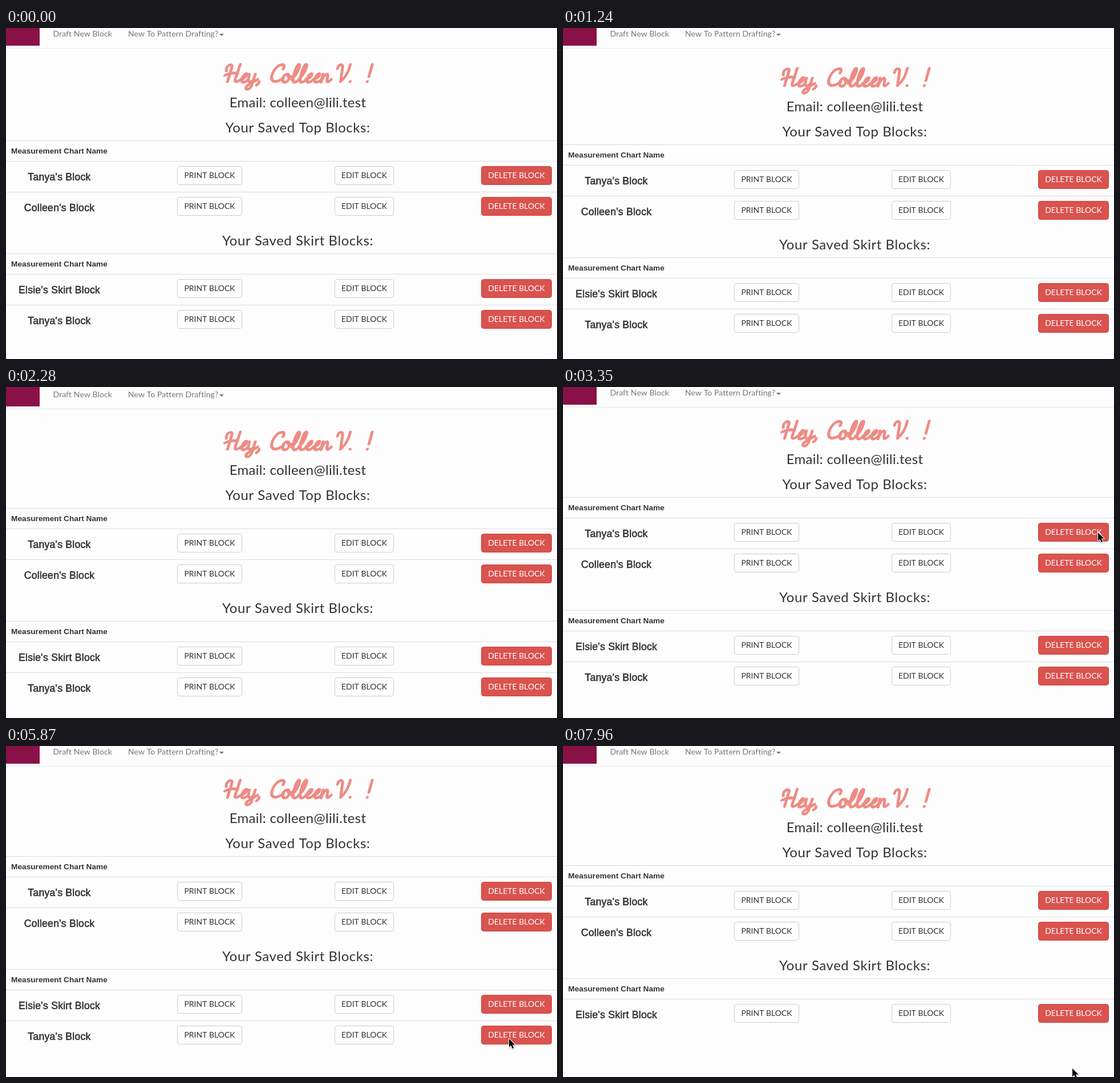
Write an HTML page with a canvas that moves like this. It is 966 px wide and 580 px high and loops after 8000 ms.

```html
<!DOCTYPE html>
<html lang="en">
<head>
<meta charset="utf-8">
<title>Saved blocks</title>
<style>
html, body { margin: 0; width: 100%; height: 100%; overflow: hidden; background: #fdfdfd; }
canvas { display: block; }
</style>
</head>
<body>
<canvas id="stage" width="966" height="580"></canvas>
<script>
const ctx = document.getElementById('stage').getContext('2d');
const LOOP = 8000;
const HOLD = 145;        // the picture is refreshed in steps of this length
const MAX_SCROLL = 16;
const DELETED = 6610;
const INK = '#333333';
const SANS = 'Lato, sans-serif';
const ARIAL = '"Liberation Sans", Arial, sans-serif';

// Legs: start time, number of steps, end point, sideways bend
const PAGE = [
  [500, 3, [-2]], [950, 5, [18]], [1990, 3, [19]],
  [2460, 2, [-1]], [2910, 1, [0]], [DELETED, 1, [MAX_SCROLL]]
];
const POINTER = [
  [3350, 1, [938, 255]], [3500, 6, [878, 472], -56], [4530, 5, [877, 517]],
  [5570, 3, [882, 513]], [6760, 2, [882, 516]], [7810, 2, [893, 565]]
];

function follow(start, legs, t) {
  let pos = start;
  for (const [at, steps, to, bend = 0] of legs) {
    if (t < at) break;
    const u = Math.min(1, (Math.floor((t - at) / HOLD) + 1) / steps);
    const e = u * u * (3 - 2 * u);
    pos = pos.map((v, i) => v + (to[i] - v) * e);
    pos[0] += bend * 4 * e * (1 - e);
  }
  return pos;
}

// Brush lettering: [advance, strokes], baseline at 0
const loop = h => `M0 -5C8 ${-h * 0.4} 11 ${-h} 7 ${-h}S-1 0 6 0Q10 0 13 -5`;
const LETTERS = {
  H: [27, 'M0 -20C-4 -29 7 -34 8 -27L6 -1M21 -31L18 -5Q18 3 28 -5M-1 -12Q10 -18 20 -15'],
  C: [20, 'M17 -23C21 -33 9 -34 3 -22C-4 -6 4 6 21 -7'],
  V: [24, 'M0 -24C0 -32 7 -33 8 -26L10 -1Q20 -12 20 -31'],
  e: [13, loop(15)],
  l: [12, loop(31)],
  o: [15, 'M6 -14C-2 -14 -2 0 5 0S12 -14 6 -14Q8 -8 16 -10'],
  n: [17, 'M1 -14V0C1 -10 11 -24 10 -4Q11 3 17 -5'],
  y: [16, 'M0 -14V-5C0 1 8 1 9 -6M10 -14L8 6C6 16 -5 12 1 6L16 -5'],
  ',': [8, 'M3 -1Q4 2 0 5'],
  '.': [8, 'M2 -1h.1'],
  '!': [8, 'M4 -31L3 -10M2 -1h.1']
};
const ARROW = new Path2D('M0 0V14.5L3.3 11.5L5.7 17L8.2 16L5.9 10.5H10.5Z');

function script(word, x, y) {
  ctx.save();
  ctx.translate(x, y);
  ctx.transform(1.04, 0, -0.22, 1, 0, 0);
  ctx.strokeStyle = '#ee8b84';
  ctx.lineWidth = 4.8;
  ctx.lineCap = ctx.lineJoin = 'round';
  for (const ch of word) {
    const [advance, d] = LETTERS[ch];
    ctx.stroke(new Path2D(d));
    ctx.translate(advance, 0);
  }
  ctx.restore();
}

function text(str, x, y, font, color, align = 'left', spacing = 0) {
  ctx.font = font;
  ctx.fillStyle = color;
  ctx.textAlign = align;
  ctx.letterSpacing = spacing + 'px';
  ctx.fillText(str, x, y);
}

function heading(str, y, spacing) {
  text(str, 511.5, y, '24px ' + SANS, INK, 'center', spacing);
}

function rule(y, color = '#dddddd') {
  ctx.fillStyle = color;
  ctx.fillRect(0, y, 966, 1);
}

function button(label, x, y, w, danger) {
  ctx.beginPath();
  ctx.roundRect(x + 0.5, y + 0.5, w - 1, 32, 4);
  ctx.fillStyle = danger ? '#d9534f' : '#ffffff';
  ctx.strokeStyle = danger ? '#d43f3a' : '#cccccc';
  ctx.lineWidth = 1;
  ctx.fill();
  ctx.stroke();
  text(label, x + w / 2, y + 21, '14px ' + SANS, danger ? '#ffffff' : INK, 'center');
}

function row(name, y) {
  rule(y);
  text(name, 93.5, y + 34, '17.6px ' + ARIAL, INK, 'center', 0.25);
  ctx.strokeStyle = INK;
  ctx.lineWidth = 0.6;
  ctx.strokeText(name, 93.5, y + 34);
  button('PRINT BLOCK', 300, y + 9, 114);
  button('EDIT BLOCK', 576, y + 9, 104);
  button('DELETE BLOCK', 833, y + 9, 124, true);
}

function table(title, names, y) {
  heading(title, y - 14, 0.55);
  rule(y);
  text('Measurement Chart Name', 9, y + 23, 'bold 13.7px ' + ARIAL, INK);
  names.forEach((name, i) => row(name, y + 36 + i * 54));
}

function nav(y) {
  ctx.fillStyle = '#8a1048';
  ctx.fillRect(0, y - 28, 59, 59);
  const item = (str, x) => text(str, x, y + 15, '14px ' + SANS, '#777777', 'left', 0.08);
  item('Draft New Block', 82.5);
  item('New To Pattern Drafting?', 214);
  ctx.fill(new Path2D(`M374 ${y + 10}h8l-4 4z`));
  rule(y + 35, '#e7e7e7');
}

function pointer([x, y]) {
  ctx.save();
  ctx.translate(x, y);
  ctx.lineJoin = 'round';
  ctx.shadowColor = 'rgba(0,0,0,.35)';
  ctx.shadowBlur = 2;
  ctx.shadowOffsetY = 1;
  ctx.strokeStyle = '#ffffff';
  ctx.lineWidth = 2;
  ctx.stroke(ARROW);
  ctx.shadowColor = 'transparent';
  ctx.fillStyle = '#000000';
  ctx.fill(ARROW);
  ctx.restore();
}

function draw(t) {
  const y = Math.round(follow([4], PAGE, t)[0]);
  const overscroll = y - Math.min(MAX_SCROLL, Math.max(0, y));
  ctx.fillStyle = '#fdfdfd';
  ctx.fillRect(0, 0, 966, 580);

  script('Hey,', 382, y + 91);
  script('Colleen', 463, y + 91);
  script('V.', 576, y + 91);
  script('!', 631, y + 91);
  heading('Email: colleen@lili.test', y + 135, 0.3);
  table('Your Saved Top Blocks:', ["Tanya's Block", "Colleen's Block"], y + 193);
  const skirts = ["Elsie's Skirt Block"];
  if (t < DELETED) skirts.push("Tanya's Block");
  table('Your Saved Skirt Blocks:', skirts, y + 391);

  nav(overscroll);
  if (t >= 3200) pointer(follow([951, 262], POINTER, t));
}

function tick() {
  draw(performance.now() % LOOP);
  requestAnimationFrame(tick);
}
tick();
</script>
</body>
</html>
```
